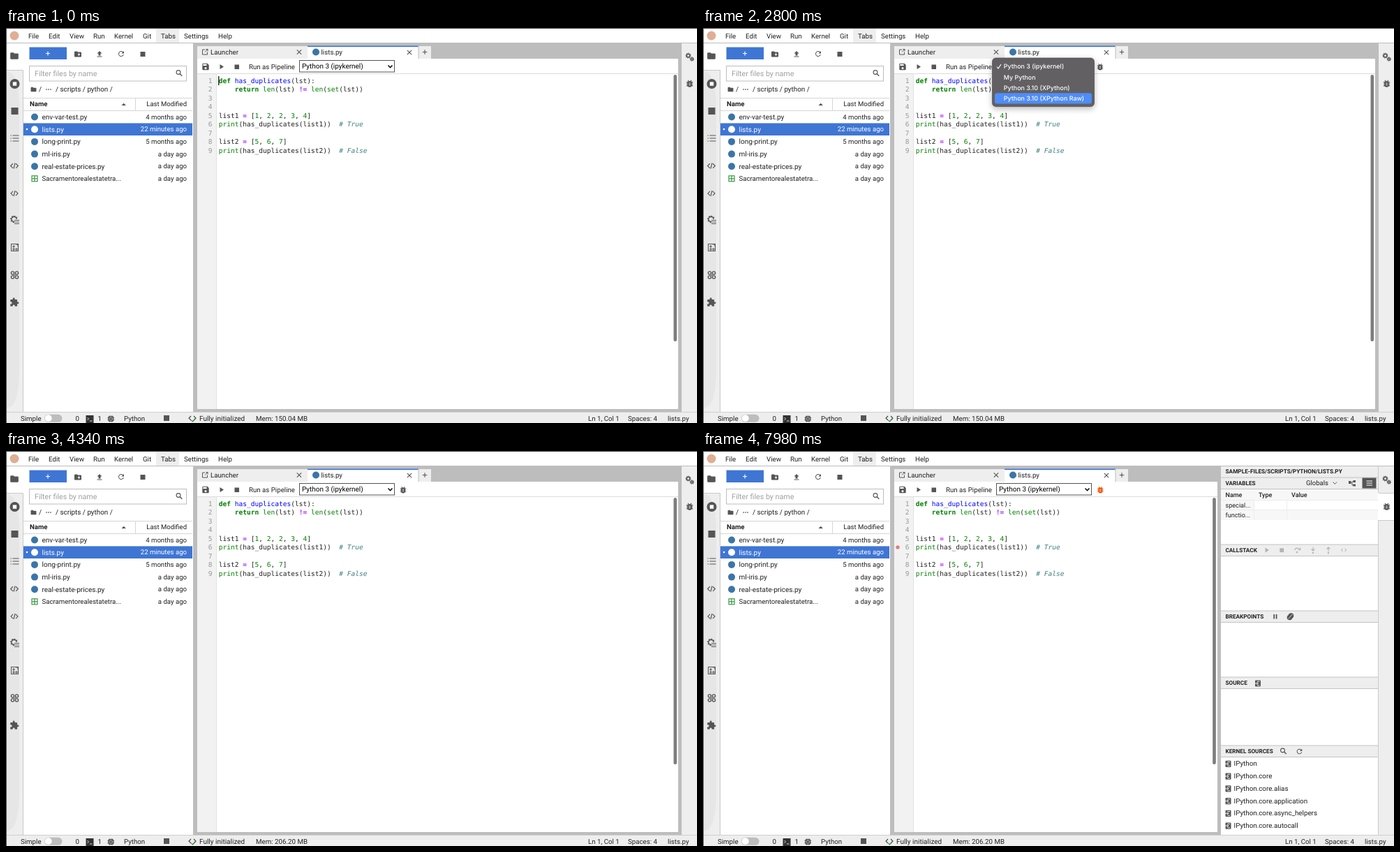
An HTML page for the animation above (8 s loop, 990 px wide and 566 px high).

```html
<!DOCTYPE html>
<html lang="en">
<head>
<meta charset="utf-8">
<title>Notebook debugger</title>
<style>
html, body { margin: 0; width: 100%; height: 100%; overflow: hidden; background: #fff; }
svg { display: block; width: 990px; height: 566px; }
text { font-family: Roboto, "Open Sans", sans-serif; white-space: pre; text-rendering: geometricPrecision; }
.code text { font-family: "DejaVu Sans Mono", monospace; font-size: 9.56px; }
.menu text { font-family: Inter, sans-serif; font-weight: 500; }
.kw { fill: #008000; font-weight: bold; }
.builtin, .num { fill: #008000; }
.name { fill: #0000ff; }
.op { fill: #aa22ff; font-weight: bold; }
.note { fill: #408080; font-style: italic; }
</style>
</head>
<body>
<svg id="stage" viewBox="0 0 990 566"></svg>
<script>
const INK = '#212121', ICON = '#555', BLUE = '#3f76d4', PY = '#3b75a8';
const PALE = '#eeeeee', EDGE = '#bdbdbd';

const rect = (x, y, w, h, fill, extra = '') =>
  `<rect x="${x}" y="${y}" width="${w}" height="${h}" fill="${fill}" ${extra}/>`;
const dot = (x, y, r, fill, extra = '') => `<circle cx="${x}" cy="${y}" r="${r}" fill="${fill}" ${extra}/>`;
const line = (d, color = ICON, width = 1, extra = '') =>
  `<path d="${d}" fill="none" stroke="${color}" stroke-width="${width}" ${extra}/>`;
const shape = (d, fill = ICON) => `<path d="${d}" fill="${fill}"/>`;
// Text is placed by the vertical middle of its line.
const text = (x, y, s, size = 9.7, fill = INK, extra = '') =>
  `<text x="${x}" y="${y + size * 0.35}" font-size="${size}" fill="${fill}" ${extra}>${s}</text>`;
const END = 'text-anchor="end"';
const group = (id, body, extra = '') => `<g id="${id}" ${extra}>${body}</g>`;

const GLYPHS = {
  folder: 'M10 4H4c-1.1 0-2 .9-2 2v12c0 1.1.9 2 2 2h16c1.1 0 2-.9 2-2V8c0-1.1-.9-2-2-2h-8z',
  refresh: 'M17.65 6.35A8 8 0 1 0 19.73 14h-2.08A6 6 0 1 1 16.22 7.78L13 11h7V4z',
  upload: 'M5 20h14v-2H5zM5 10h4v6h6v-6h4l-7-7z',
  save: 'M17 3H5a2 2 0 0 0-2 2v14a2 2 0 0 0 2 2h14a2 2 0 0 0 2-2V7zM12 19a3 3 0 1 1 0-6 3 3 0 0 1 0 6zM15 9H5V5h10z',
  puzzle: 'M20.5 11H19V7a2 2 0 0 0-2-2h-4V3.5a2.5 2.5 0 0 0-5 0V5H4a2 2 0 0 0-2 2v3.8h1.5a2.7 2.7 0 0 1 0 5.4H2V20a2 2 0 0 0 2 2h3.8v-1.5a2.7 2.7 0 0 1 5.4 0V22H17a2 2 0 0 0 2-2v-4h1.5a2.5 2.5 0 0 0 0-5z',
  angle: 'M9.4 16.6L4.8 12l4.6-4.6L8 6l-6 6 6 6zM14.6 16.6l4.6-4.6-4.6-4.6L16 6l6 6-6 6z',
};
const glyph = (name, x, y, size, fill = ICON) =>
  `<path transform="translate(${x - size / 2} ${y - size / 2}) scale(${size / 24})" fill-rule="evenodd" d="${GLYPHS[name]}" fill="${fill}"/>`;
const play = (x, y, fill) => shape(`M${x - 2.5} ${y - 3.6}l5.5 3.6-5.5 3.6z`, fill);
const cross = (x, y) => line(`M${x - 3.2} ${y - 3.2}l6.4 6.4m0-6.4l-6.4 6.4`, '#555', 1.1);
const plus = (x, y, color, r = 3) => line(`M${x - r} ${y}h${2 * r}M${x} ${y - r}v${2 * r}`, color, 1.1);
const search = (x, y) => dot(x - 1, y - 1, 2.9, 'none', `stroke="${ICON}" stroke-width="1.1"`) +
  line(`M${x + 1} ${y + 1}l3.3 3.3`, ICON, 1.4);
const gear = (x, y, r) => dot(x, y, r, 'none', `stroke="${ICON}" stroke-width="1.6"`) +
  dot(x, y, r + 1.1, 'none', `stroke="${ICON}" stroke-width="1.3" pathLength="16" stroke-dasharray="1 1"`);
const bug = (x, y, fill, s = 1) => `<g transform="translate(${x} ${y}) scale(${s})">` +
  line('M-4.2 -2.2h8.4M-4.2 0h8.4M-4.2 2.3h8.4M-2.4 -4.6l1.7 1.7M2.4 -4.6l-1.7 1.7', fill, 1.1) +
  rect(-3, -3.6, 6, 8, fill, 'rx="3"') + line('M-1 -0.7h2M-1 1.4h2', '#fff', 0.9) + '</g>';
const chip = (x, y) => rect(x - 3.2, y - 3.2, 6.4, 6.4, 'none', `rx="1" stroke="${ICON}" stroke-width="1.6"`) +
  rect(x - 1.2, y - 1.2, 2.4, 2.4, ICON) +
  line(`M${x - 1.5} ${y - 5}v10M${x + 1.5} ${y - 5}v10M${x - 5} ${y - 1.5}h10M${x - 5} ${y + 1.5}h10`, ICON, 0.7);
const sheet = (x, y) => rect(x - 4, y - 4.6, 8, 9.2, ICON, 'rx="1"') +
  line(`M${x - 4.6} ${y}h5m-2 -2l2 2 -2 2M${x - 1} ${y - 2.8}h3.5M${x - 1} ${y + 3}h3.5`, '#fff', 0.9);

function menuBar() {
  const items = [['File', 32], ['Edit', 61], ['View', 91], ['Run', 125], ['Kernel', 155],
    ['Git', 196], ['Tabs', 222], ['Settings', 255], ['Help', 304]];
  return rect(0, 0, 990, 21, '#fff') + rect(215, 1, 33, 20, PALE) + dot(12, 11, 6.5, '#dfae95') +
    items.map(([s, x]) => text(x, 11.5, s)).join('') + rect(0, 21, 990, 1, EDGE) + rect(0, 0, 990, 1, '#444');
}

function leftStrip() {
  return rect(0, 22, 25, 528, PALE) + rect(0, 22, 25, 38, '#fff') + line('M0 60.5h24.5V550', '#c8c8c8') +
    shape('M0 62C14 62 19 82 19 120V485C19 525 14 543 0 545Z', '#e6e6e6') +
    glyph('folder', 12, 40, 14) +
    dot(12.5, 80, 7, ICON) + rect(9.8, 77.3, 5.4, 5.4, '#fff') +
    rect(7.5, 114, 10, 10, ICON) +
    [154, 158, 162].map(y => line(`M6.5 ${y}h1.4M9.5 ${y}h9`, ICON, 1.2)).join('') +
    [197.5, 237].map((y, i) => glyph('angle', 12, y, 15 - i) + line(`M13 ${y - 4}l-2 8`, ICON, 1.1)).join('') +
    gear(11.5, 274, 3.6) + rect(12, 274, 8, 8, PALE) + line('M12 275.5h7M12 278h7M12 280.5h7', ICON, 1.2) +
    rect(7.5, 309.5, 10, 10, 'none', `stroke="${ICON}"`) +
    line('M10 312h2v2h-2zM10 316h2v2h-2zM14 316h2v2h-2zM14 310h3v3', ICON, 1) +
    [[9.5, 351], [15.5, 351], [9.5, 357], [15.5, 357]].map(([x, y]) =>
      dot(x, y, 2.1, 'none', `stroke="${ICON}" stroke-width="1.4"`)).join('') +
    line('M11 354h3', ICON, 1.2) + glyph('puzzle', 12, 393, 14);
}

function fileBrowser() {
  const files = [['env-var-test.py', '4 months ago'], ['lists.py', '22 minutes ago'], ['long-print.py', '5 months ago'],
    ['ml-iris.py', 'a day ago'], ['real-estate-prices.py', 'a day ago'], ['Sacramentorealestatetra...', 'a day ago']];
  const rows = files.map(([name, age], i) => {
    const y = 127.3 + i * 17.7, active = i === 1, ink = active ? '#fff' : INK;
    const icon = i < 5 ? dot(41, y + 0.2, 5, active ? '#fff' : PY)
      : rect(37, y - 4, 8, 8, '#fff', 'stroke="#3a9a45" stroke-width="1.2"') + line(`M41 ${y - 4}v8M37 ${y}h8`, '#3a9a45', 1.2);
    return (active ? rect(25, y - 8.6, 242, 17.6, BLUE) + dot(30, y, 1.3, '#fff') : '') + icon +
      text(51.5, y, name, i === 5 ? 9.65 : 10, ink) + text(259, y, age, 9.6, ink, END);
  }).join('');
  return rect(25, 22, 243, 528, '#fff') + rect(33.5, 27.5, 53.5, 17.5, BLUE) + plus(60, 36.5, '#fff') +
    glyph('folder', 103, 37.5, 12) + plus(104.5, 38, '#fff', 1.8) + glyph('upload', 134, 37.5, 12) +
    glyph('refresh', 165, 37, 12) + rect(192.5, 34, 7, 7, ICON) +
    rect(33.5, 54.5, 225, 21.5, '#fff', `stroke="${EDGE}"`) +
    text(41, 65.5, 'Filter files by name', 10.7, '#a0a0a0') + search(248, 64.5) +
    glyph('folder', 39.5, 88, 9.5) + text(47, 88, '/', 9.9) +
    [58, 61, 64].map(x => dot(x, 88, 0.8, INK)).join('') + text(71, 88, '/ scripts / python /', 9.9) +
    line('M25 100.5h242M25 118.5h242M185.5 100v18', '#d6d6d6') +
    text(34, 109, 'Name', 9.6, INK, 'font-weight="bold"') + shape('M165.5 111l3.2-3.2 3.2 3.2z') +
    text(259, 109, 'Last Modified', 9.5, INK, END) + rows;
}

function editor() {
  const span = (kind, s) => `<tspan class="${kind}">${s}</tspan>`;
  const len = span('builtin', 'len'), print = span('builtin', 'print');
  const list = (n, values) => `list${n} ${span('op', '=')} [${values.map(v => span('num', v)).join(', ')}]`;
  const call = (n, result) => `${print}(has_duplicates(list${n}))  ${span('note', '# ' + result)}`;
  const lines = [`${span('kw', 'def')} ${span('name', 'has_duplicates')}(lst):`,
    `    ${span('kw', 'return')} ${len}(lst) ${span('op', '!=')} ${len}(${span('builtin', 'set')}(lst))`,
    '', '', list(1, [1, 2, 2, 3, 4]), call(1, 'True'), '', list(2, [5, 6, 7]), call(2, 'False')];
  const code = lines.map((s, i) => {
    const y = lineY(i + 1);
    return text(295.5, y, i + 1, 9.56, '#999', END) + text(304.7, y, s, 9.56);
  }).join('');
  return rect(268, 22, 700, 528, EDGE) +
    rect(274, 26, 158, 18, PALE) + rect(432, 26, 158.5, 18, '#fff') + rect(432, 25.5, 158.5, 1.6, BLUE) +
    rect(591.5, 26, 17.5, 18, PALE) + plus(600, 34.5, '#555', 3.2) +
    line('M285 31h-3.5v7h7v-3.5M285 34.5l4-4M286.3 30.5h2.7v2.7', ICON, 1) + text(293, 34.5, 'Launcher', 9.7) +
    cross(420, 34.5) + dot(444, 34.5, 5, PY) + text(451.5, 35, 'lists.py', 9.7) + cross(578, 35) +
    rect(274, 44, 689, 502, '#fff') + line('M274 65.5h689', '#dcdcdc') + rect(274, 66, 27.5, 480, '#f2f2f2') +
    line('M301.5 66v480', '#e2e2e2') +
    glyph('save', 286, 55.5, 12.5) + play(309, 55.5, ICON) + rect(327.5, 52.5, 6.5, 6.5, ICON) +
    text(348, 55.3, 'Run as Pipeline') +
    rect(420.5, 46.5, 136, 16.5, '#fff', 'stroke="#555"') + text(424, 55, 'Python 3 (ipykernel)', 9.95, '#000') +
    line('M547.5 53.5l3 3 3-3', '#111', 1.6) +
    rect(956.5, 67, 4.6, 382, '#7c7c7c', 'rx="2.2"') + `<g class="code">${code}</g>`;
}

function rightStrip() {
  return rect(968, 22, 22, 528, PALE) + group('bugTab', rect(967, 60, 23, 39.5, '#fff') +
    line('M968 60.5h22M968 99.5h22M967.5 22v38M967.5 99v451', '#cacaca')) +
    gear(977.5, 39.5, 2.3) + gear(982.8, 44.5, 1.5) + bug(979.5, 80, ICON, 1.1);
}

function statusBar() {
  return rect(0, 550, 990, 16, PALE) + line('M0 550.5h990', '#cfcfcf') + text(21, 559.5, 'Simple') +
    rect(55, 553.8, 25.5, 11, '#bdbdbd', 'rx="5.5"') + dot(60.7, 559.3, 5, '#fff') +
    text(99.5, 559.5, '0') + rect(114.5, 555, 11, 11, '#333') + line('M116.5 558l2 2-2 2M120 563h3.5', '#fff', 0.8) +
    text(131.5, 559.5, '1') + chip(150.3, 560) + text(169, 559.5, 'Python') + rect(226, 555, 8, 8, ICON) +
    line('M265 556l-3 3 3 3M269 556l3 3-3 3', '#444', 1.1) + line('M265.5 562l2 2 4.5-5', '#2f8f3a', 1.2) +
    text(277, 559.5, 'Fully initialized', 10) + group('memory', text(358, 559.5, '', 9.75)) +
    text(834, 559.5, 'Ln 1, Col 1', 9.7) + text(891, 559.5, 'Spaces: 4', 9.7) + text(978.5, 559.5, 'lists.py', 9.7, INK, END);
}

function debugPanel() {
  const bold = 'font-weight="600"';
  const bar = (y, title) => rect(742, y - 8, 225, 16.5, PALE) +
    line(`M742 ${y - 8}h225M742 ${y + 8.5}h225`, '#c4c4c4') + text(748.5, y, title, 8.2, INK, bold);
  const modules = ['', '.core', '.core.alias', '.core.application', '.core.async_helpers', '.core.autocall'];
  const list = modules.map((s, i) => {
    const y = 448 + i * 17.75;
    return sheet(752.5, y + 0.3) + text(760.5, y, 'IPython' + s, 9.8);
  }).join('');
  const dim = '#b4b4b4';
  return rect(730, 66, 7, 480, '#fff') + rect(730.2, 67, 4.6, 382, '#7c7c7c', 'rx="2.2"') +
    rect(737, 22, 5, 528, EDGE) + rect(742, 22, 225.5, 528, '#fff') +
    rect(742, 22, 225, 16, PALE) + text(748.5, 29.5, 'SAMPLE-FILES/SCRIPTS/PYTHON/LISTS.PY', 8.25, INK, bold) +
    bar(46, 'VARIABLES') + text(864, 46, 'Globals', 9.5) + line('M902.5 44.5l2.8 2.8 2.8-2.8') +
    rect(925, 43, 3.5, 4, ICON) + rect(931.5, 42, 3.5, 3, ICON) + rect(931.5, 47.5, 3.5, 3, ICON) + line('M928 45h2v4h2M930 44h2') +
    rect(944.5, 38.5, 20, 15, '#555') + line('M950.5 43h8.5M950.5 46h8.5M950.5 49h8.5', '#fff', 1.1) +
    rect(742, 55, 225, 44, '#f7f7f7') + rect(789, 70, 178, 14, '#fff') +
    line('M742 70.5h225M742 84.5h225M789.5 70v28M836.5 70v28', '#ececec') +
    [['Name', 748.5], ['Type', 796], ['Value', 843]].map(([s, x]) => text(x, 63, s, 9, INK, 'font-weight="500"')).join('') +
    text(748.5, 77.5, 'special...', 9.1) + text(748.5, 92.3, 'functio...', 9.1) +
    bar(142, 'CALLSTACK') + play(808, 142, dim) + rect(826.3, 139.3, 5.8, 5.8, dim) +
    line('M847.5 142a4 4 0 0 1 7.5-.5m.8-3v3.3h-3.3', dim, 1.1) + dot(851, 145, 1.2, dim) +
    line('M874 137.5v5.5m-2.5-2.5l2.5 2.5 2.5-2.5M896 144v-6m-2.5 2.5l2.5-2.5 2.5 2.5', dim, 1.1) +
    dot(874, 146, 1.2, dim) + dot(896, 146, 1.2, dim) + glyph('angle', 918, 142, 10, dim) +
    bar(237, 'BREAKPOINTS') + line('M818.2 234v6.5M821.6 234v6.5', ICON, 1.8) +
    dot(842.5, 236, 3.8, ICON) + dot(840.5, 238.5, 3.8, ICON) + line('M838.5 240.5l6-6.5', '#fff', 0.8) +
    bar(332, 'SOURCE') + sheet(795, 333) +
    bar(430, 'KERNEL SOURCES') + search(831.5, 430) + glyph('refresh', 854.5, 430.5, 11.5) + group('modules', list);
}

function kernelMenu() {
  const names = ['Python 3 (ipykernel)', 'My Python', 'Python 3.10 (XPython)', 'Python 3.10 (XPython Raw)'];
  return rect(414.5, 43, 146, 69.5, '#626164', 'rx="5" stroke="#4c4b4e" stroke-width="0.7" filter="url(#shadow)"') +
    rect(418, 47.3, 139, 15.4, '#4f8df7', 'id="pick" rx="3"') +
    line('M421 55.5l2 2.5 4-6', '#fff', 1.2) +
    names.map((s, i) => text(430.7, 55.2 + i * 15.3, s, 8.95, '#fff')).join('');
}

function lineY(n) { return 75.2 + (n - 1) * 12.56; }

const stage = document.getElementById('stage');
stage.innerHTML = `<defs><filter id="shadow" x="-20%" y="-30%" width="140%" height="170%">
  <feDropShadow dx="0" dy="3" stdDeviation="4" flood-opacity="0.28"/></filter></defs>` +
  rect(0, 0, 990, 566, '#fff') + menuBar() + leftStrip() + fileBrowser() + editor() +
  group('caret', rect(304.2, 69, 1.2, 13, '#000')) +
  group('breakpoint', dot(279, 0, 2.7, '#dd7f83')) +
  group('bugIdle', bug(569, 56, ICON)) + group('bugActive', bug(569.3, 56, '#e8590c')) +
  group('panel', debugPanel()) + rightStrip() + statusBar() + group('menu', kernelMenu(), 'class="menu"') +
  rect(0, 0, 1, 566, '#555');

const part = Object.fromEntries([...stage.querySelectorAll('[id]')].map(el => [el.id, el]));
const memoryText = part.memory.querySelector('text');
const show = (el, on) => el.setAttribute('visibility', on ? 'visible' : 'hidden');
const between = (t, a, b) => t >= a && t < b;
// Last value whose start time has been reached.
const at = (t, steps) => steps.reduce((value, [start, next]) => t >= start ? next : value, null);

const PICKS = [[2240, 0], [2450, 1], [2730, 2], [2800, 3], [3080, 2], [3150, 1], [3290, 0]];
const MENU_ALPHA = [[0, 0], [2240, 1], [4130, 0.8], [4200, 0.5], [4270, 0.2], [4340, 0]];

function draw(t) {
  show(part.caret, t < 210 || between(t, 770, 1330) || between(t, 1890, 2170));
  show(part.bugIdle, between(t, 770, 6300));
  show(part.bugActive, t >= 6300);
  part.menu.setAttribute('opacity', at(t, MENU_ALPHA));
  part.pick.setAttribute('y', 47.3 + (at(t, PICKS) || 0) * 15.3);
  part.pick.setAttribute('opacity', between(t, 3990, 4060) ? 0 : 1);
  memoryText.textContent = `Mem: ${t < 4200 ? '150.04' : '206.20'} MB`;
  const open = t >= 5460;
  part.panel.setAttribute('display', open ? 'inline' : 'none');
  show(part.bugTab, open);
  show(part.modules, t >= 6300);
  show(part.breakpoint, t >= 7910);
  part.breakpoint.setAttribute('transform', `translate(0 ${lineY(t < 7980 ? 1 : 6)})`);
}

const start = performance.now();
function tick() {
  draw((performance.now() - start) % 8000);
  requestAnimationFrame(tick);
}
tick();
</script>
</body>
</html>
```
